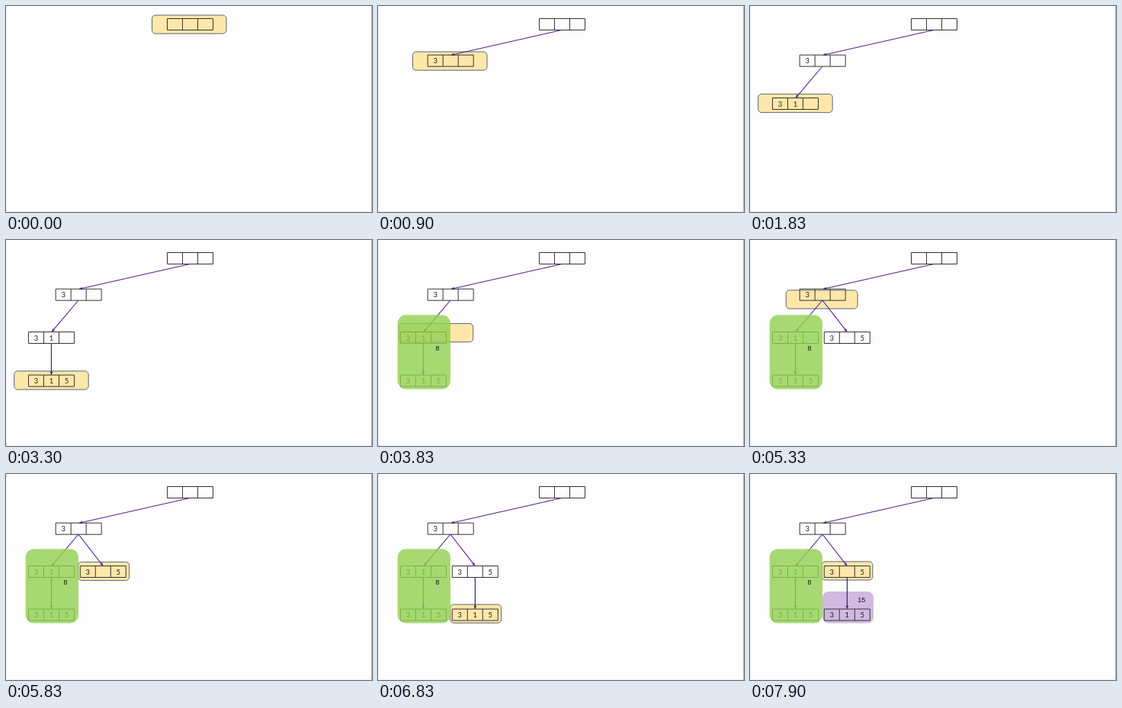
Write an HTML page that moves like this. It is 480 px wide and 270 px high and loops after 8 s.

```html
<!DOCTYPE html>
<html lang="en">
<head>
<meta charset="utf-8">
<title>Recursion tree</title>
<style>
  html, body { margin: 0; width: 100%; height: 100%; overflow: hidden; background: #fdfdfd; }
  svg { display: block; width: 480px; height: 270px; }
  text { font: 9.5px Lato, "Open Sans", sans-serif; text-anchor: middle; fill: #202020; }
  .sum { font: 9px "Liberation Sans", Arial, sans-serif; fill: #111; }
  .cells { fill: none; stroke: #363636; stroke-width: 1; }
</style>
</head>
<body>
<svg id="stage" viewBox="0 0 480 270"></svg>
<script>
const LOOP = 8000;
const stage = document.getElementById("stage");

function add(parent, tag, attrs = {}, text = "") {
  const el = document.createElementNS("http://www.w3.org/2000/svg", tag);
  for (const key in attrs) el.setAttribute(key, attrs[key]);
  el.textContent = text;
  parent.append(el);
  return el;
}

function play(el, frames) {
  el.animate(frames, { duration: LOOP, iterations: Infinity });
}

// Hidden until `start`; a zero fade is a hard change.
function reveal(el, start, fade = 0) {
  play(el, [
    { offset: 0, opacity: 0 },
    { offset: start / LOOP, opacity: 0 },
    { offset: (start + fade) / LOOP, opacity: 1 },
    { offset: 1, opacity: 1 }
  ]);
}

function node(parent, x, y, digits) {
  const group = add(parent, "g");
  add(group, "path", { class: "cells", d: `M${x} ${y}h60v15h-60zM${x + 20} ${y}v15M${x + 40} ${y}v15` });
  [...digits].forEach((digit, i) => {
    if (digit !== " ") add(group, "text", { x: x + 10 + i * 20, y: y + 11 }, digit);
  });
  return group;
}

function arrow(parent, x1, y1, x2, y2, color) {
  const angle = Math.atan2(y2 - y1, x2 - x1) * 180 / Math.PI;
  add(parent, "line", { x1, y1, x2, y2, stroke: color, "stroke-width": 1.15 });
  add(parent, "path", {
    d: "M0 0L-4 -1.9V1.9Z", fill: color,
    transform: `translate(${x2} ${y2}) rotate(${angle})`
  });
}

function panel(x, y, width, height, rx, fill, opacity = 1) {
  const group = add(stage, "g");
  add(group, "rect", { x, y, width, height, rx, fill, "fill-opacity": opacity });
  return group;
}

const purplePanel = panel(95, 154, 67, 41.5, 8, "#d0b8e0");
reveal(purplePanel, 6850, 350);

const marker = add(stage, "rect", {
  x: 191.5, y: 12, width: 97.5, height: 24.2, rx: 4.5,
  fill: "#ffe7aa", stroke: "#596879", "stroke-width": 1
});

// [start, end, x, y, width] for each stop of the marker
const stops = [
  [0, 0, 191.5, 12, 97.5],
  [200, 720, 45.5, 60, 97.5],
  [1040, 1560, 10.7, 115.4, 97.5],
  [1940, 2460, 10.7, 171.8, 97.5],
  [3550, 4080, 40.7, 59, 97.5],
  [5200, 5740, 94.7, 115.3, 67],
  [6030, 6560, 94.7, 171, 67],
  [6930, 7460, 94.3, 114.8, 66.5]
];
const pose = ([, , x, y, width]) => ({ x: x + "px", y: y + "px", width: width + "px" });
const path = stops.flatMap((stop, i) => i === 0
  ? [{ offset: 0, ...pose(stop) }]
  : [
      { offset: stop[0] / LOOP, ...pose(stops[i - 1]), easing: "ease-in-out" },
      { offset: stop[1] / LOOP, ...pose(stop) }
    ]);
path.push({ offset: 1, ...pose(stops.at(-1)) });
play(marker, path);

const VIOLET = "#54258c", NAVY = "#30304a", INDIGO = "#37206a";
node(stage, 211.5, 16.5, "   ");

// [time, x, y, digits, arrow ends, arrow colour]
const calls = [
  [150, 65.2, 64.2, "3  ", [241, 31.5, 96, 64.2], VIOLET],
  [990, 29.5, 120.5, "31 ", [95, 79, 60, 120.3], VIOLET],
  [1890, 29.5, 177, "315", [59.5, 135.5, 59.5, 176.8], NAVY],
  [5150, 97.3, 120.5, "3 5", [95, 79, 127.2, 120.3], VIOLET],
  [5980, 97.3, 177, "315", [127.4, 135.5, 127.4, 176.8], INDIGO]
];
for (const [time, x, y, digits, ends, color] of calls) {
  const group = add(stage, "g");
  arrow(group, ...ends, color);
  node(group, x, y, digits);
  reveal(group, time);
}

const greenPanel = panel(25.7, 98.3, 69.3, 97.2, 11, "#92d050", 0.8);
add(greenPanel, "text", { class: "sum", x: 78, y: 145.3 }, "8");
reveal(greenPanel, 3430, 400);

const total = add(stage, "text", { class: "sum", x: 146.2, y: 167.5 }, "15");
reveal(total, 6850, 350);

add(stage, "rect", { x: 479, y: 0, width: 1, height: 270, fill: "#a8a8a8" });
add(stage, "rect", { x: 0, y: 0, width: 1, height: 270, fill: "#ececec" });
add(stage, "rect", { x: 0, y: 269, width: 479, height: 1, fill: "#efefef" });
</script>
</body>
</html>
```
